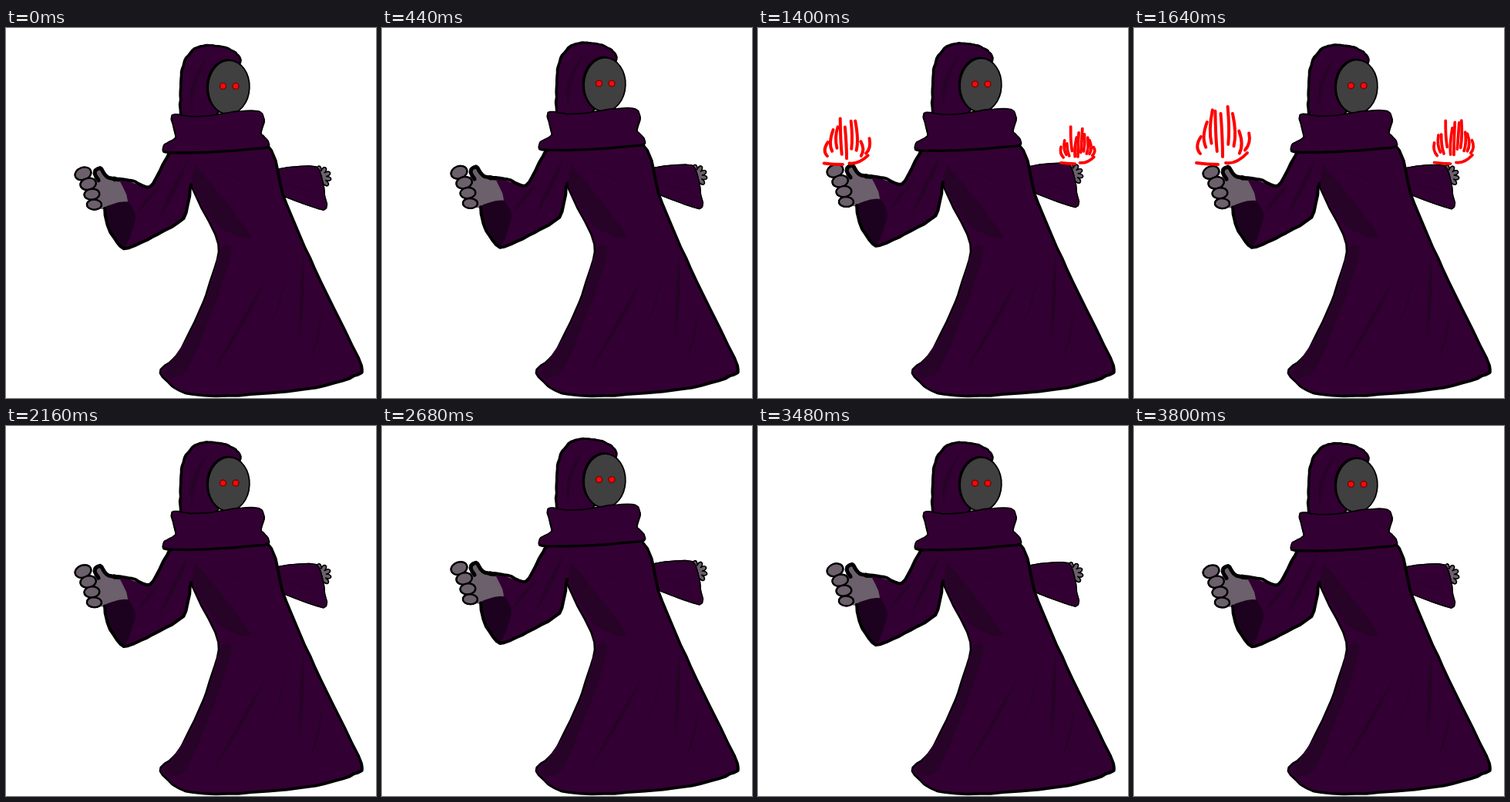
These frames come from a looping animation (480 px wide and 480 px high, 3840 ms). An HTML page with a canvas:

```html
<!DOCTYPE html>
<html lang="en">
<head>
<meta charset="utf-8">
<title>Hooded caster</title>
<style>
html, body { margin: 0; width: 100%; height: 100%; overflow: hidden; background: #fff; }
canvas { display: block; width: 480px; height: 480px; }
</style>
</head>
<body>
<canvas id="stage" width="480" height="480"></canvas>
<script>
const ctx = document.getElementById('stage').getContext('2d');
const LOOP = 3840, STEP = 40, BREATH = 1920;
const ROBE = '#330033', SHADE = '#280328', INSIDE = '#1d021f';
const FACE = '#404040', SKIN = '#6b606b', RED = '#ff0000';

function seeded(seed) {
  return () => {
    seed = (seed * 16807) % 2147483647;
    return seed / 2147483647;
  };
}
const clamp = v => Math.min(1, Math.max(0, v));

// Smooth curve through key points with a slight hand-drawn wobble.
const wobble = seeded(77);
function curve(text, closed = true) {
  const pts = text.split(' ').map(p => p.split(',').map(Number));
  const n = pts.length, path = new Path2D();
  const at = i => closed ? pts[(i + n) % n] : pts[Math.max(0, Math.min(n - 1, i))];
  for (let i = 0; i < (closed ? n : n - 1); i++) {
    const [p0, p1, p2, p3] = [at(i - 1), at(i), at(i + 1), at(i + 2)];
    for (let s = 0; s < 5; s++) {
      const u = s / 5, v = 1 - u;
      const [x, y] = [0, 1].map(k => {
        const a = p1[k] + (p2[k] - p0[k]) / 8, b = p2[k] - (p3[k] - p1[k]) / 8;
        return v ** 3 * p1[k] + 3 * v * v * u * a + 3 * v * u * u * b + u ** 3 * p2[k] + wobble() - 0.5;
      });
      path.lineTo(x, y);
    }
  }
  if (closed) path.closePath(); else path.lineTo(...pts[n - 1]);
  return path;
}
function oval(x, y, rx, ry, turn = 0) {
  const path = new Path2D();
  path.ellipse(x, y, rx, ry, turn, 0, Math.PI * 2);
  return path;
}
function fill(path, color) { ctx.fillStyle = color; ctx.fill(path); }
function stroke(path, width, color = '#000') {
  ctx.strokeStyle = color; ctx.lineWidth = width; ctx.stroke(path);
}
function shifted(dx, dy, draw) {
  ctx.save(); ctx.translate(dx, dy); draw(); ctx.restore();
}
// Filled shape whose outline is heavier on the side it is pushed towards.
function inked(path, color, width, dx = 0, dy = 0) {
  stroke(path, width);
  shifted(dx, dy, () => stroke(path, width));
  fill(path, color);
}
// Cloth crease: a bowed sliver between two points.
function fold(x1, y1, x2, y2, width, bow = 8) {
  const path = new Path2D(), mx = (x1 + x2) / 2, my = (y1 + y2) / 2;
  path.moveTo(x1, y1);
  path.quadraticCurveTo(mx + bow, my, x2, y2);
  path.quadraticCurveTo(mx + bow - width * 2, my, x1, y1);
  fill(path, SHADE);
}

const body = curve('238,150 241,203 277,280 266,330 250,373 223,425 201,447 232,472 300,475 400,465 450,450 459,437 421,358 386,285 357,215 335,150');
const sideShade = curve('279,287 293,289 276,345 235,444 206,448 250,377');
const chestShade = curve('245,178 318,270 276,258 242,204');
const sleeve = curve('140,195 187,206 207,171 214,158 246,158 240,203 230,247 190,271 153,286 133,260 128,234');
const sleeveTop = curve('140,195 163,198 187,206 207,171 214,158', false);
const sleeveHem = curve('240,203 230,247 190,271 153,286 133,260 128,234', false);
const cuff = curve('128,233 158,226 168,248 153,285 133,260');
const palm = curve('117,184 125,184 133,193 146,197 158,228 124,235 110,220');
const thumb = curve('120,198 115,187 122,182 132,194 146,197', false);
const farSleeve = curve('347,186 402,181 412,213 412,235 354,213');
const hood = curve('231,116 228,88 229,62 234,43 246,28 264,24 286,27 299,35 303,45 285,80 272,112');
const scarf = curve('216,114 240,116 264,115 300,109 328,109 334,119 330,136 339,147 335,154 262,160 208,160 207,151 221,142');
const face = oval(289, 77, 26, 34, 0.04);

function drawBody() {
  inked(body, ROBE, 5, 1.5, 1);
  fill(sideShade, SHADE);
  fill(chestShade, SHADE);
  fold(265, 182, 312, 202, 3);
  fold(338, 325, 268, 448, 6);
  fold(362, 320, 343, 386, 2);
  fold(385, 296, 380, 404, 6);
  fold(411, 363, 394, 432, 3);
}

function drawNearArm() {
  fill(sleeve, ROBE);
  fold(237, 168, 199, 246, 7);
  fold(205, 200, 170, 242, 6, 2);
  fill(palm, SKIN);
  fill(cuff, INSIDE);
  stroke(sleeveTop, 4);
  stroke(sleeveHem, 4);
  stroke(thumb, 5);
  for (let i = 0; i < 4; i++) {
    const finger = oval(100 + 7.5 * i - 0.9 * i * i, 189 + 13.4 * i, 9.5 - 0.4 * i, 6.8 - 0.5 * i, 0.13 * i - 0.35);
    inked(finger, SKIN, 4.5);
  }
}

function drawFarArm() {
  for (let i = 0; i < 5; i++) {
    const a = -1.65 + i * 0.6;
    inked(oval(407 + 10 * Math.cos(a), 194 + 10 * Math.sin(a), 4, 2, a), SKIN, 3);
  }
  fill(oval(408, 194, 7, 8), SKIN);
  inked(farSleeve, ROBE, 3);
  fold(358, 200, 408, 216, 5, 2);
}

function drawHead() {
  inked(hood, ROBE, 5, -1, -0.5);
  fold(262, 37, 242, 108, 6, -10);
  inked(face, FACE, 3.5, -1.5, -1);
  for (const x of [281.5, 298]) {
    fill(oval(x, 75.5, 4.8, 4.6), '#6d0808');
    fill(oval(x, 75.5, 3.3, 3.3), '#fa0808');
  }
  inked(scarf, ROBE, 3.5, 0, 1.5);
  for (let i = 0; i < 3; i++) fold(222 + i * 6, 150 - i * 12, 322, 145 - i * 13, 2, 3);
}

// Tongues of fire: tall in the middle, short and outward at the rim.
function flameTongues(count, seed) {
  const rand = seeded(seed), tongues = [];
  for (let i = 0; i < count; i++) {
    const u = i / (count - 1) * 2 - 1, rim = Math.abs(u);
    const foot = 8 + 22 * rand() * (1.3 - rim) + 6 * rim;
    const rise = 22 + 46 * (1 - rim) * (0.55 + 0.45 * rand());
    tongues.push({ x: u * 29, y: -foot, tipX: u * 32 + rand() * 8 - 4, tipY: -foot - rise, bow: u * 8 });
  }
  return tongues;
}
const flames = [
  { x: 115, base: 177, scale: 1, width: 4, tongues: flameTongues(9, 41) },
  { x: 415, base: 176, scale: 0.75, width: 5, tongues: flameTongues(11, 93) }
];

function drawFlame({ x, base, scale, width, tongues }, t) {
  const grow = clamp((t - 1120) / 400), end = clamp((t - 1680) / 360);
  const beat = (t - 1640) / 80, spread = scale * (0.55 + 0.45 * grow) * (1 + end * 0.45);
  const height = scale * (0.25 + 0.75 * grow) * (1 - end * 0.15);
  const ink = width * (1 - end * 0.65);
  shifted(x, base - end * 10, () => {
    tongues.forEach((g, i) => {
      const lick = 1 + 0.12 * Math.sin(beat * 2 + i * 2.4) * (beat ? 1 : 0);
      const path = new Path2D();
      path.moveTo(g.x * spread, g.y * height);
      path.quadraticCurveTo((g.x + g.bow) * spread, (g.y * 0.6 + g.tipY * 0.4) * height,
        g.tipX * spread, g.tipY * height * lick);
      if (end < 0.4 + (i * 7 % 10) * 0.06) stroke(path, ink * scale, RED);
    });
    if (end < 0.5) {
      for (const [from, to] of [[-34, -6], [4, 32]]) {
        const path = new Path2D();
        path.moveTo(from * spread, -2 * height);
        path.quadraticCurveTo((from + to) / 2 * spread, 0, to * spread, (from > 0 ? -15 : 0) * height);
        stroke(path, ink * scale, RED);
      }
    }
  });
}

function drawSparks(x, y, radius, t) {
  const rand = seeded(19), reach = radius * (1 + (t - 1080) / 500);
  fill(oval(x, y, 2, 2), RED);
  for (let i = 0; i < 5; i++) {
    const a = 0.35 + i * 1.3, r = reach * (0.85 + 0.4 * rand());
    const path = new Path2D();
    path.arc(x + r * Math.cos(a), y + r * Math.sin(a), 3, a, a + 1 + rand());
    stroke(path, 1.6, RED);
  }
}

function drawMagic(t) {
  if (t >= 960 && t < 1160) {
    drawSparks(119, 162, 18, t);
    drawSparks(415, 167, 13, t);
  } else if (t >= 1160 && t < 2040) {
    for (const flame of flames) drawFlame(flame, t);
  }
}

const lift = (t, peak, height) => -height * (1 + Math.cos((t - peak) * 2 * Math.PI / BREATH)) / 2;

function render(now) {
  const t = Math.floor((now % LOOP) / STEP) * STEP;
  const armY = lift(t, 1030, 5.4);
  ctx.fillStyle = '#fff';
  ctx.fillRect(0, 0, 480, 480);
  ctx.lineCap = ctx.lineJoin = 'round';
  shifted(0, armY, drawFarArm);
  drawBody();
  shifted(0, armY, drawNearArm);
  shifted(0, lift(t, 880, 6.2), drawHead);
  drawMagic(t);
}

function tick() {
  render(performance.now());
  requestAnimationFrame(tick);
}
tick();
</script>
</body>
</html>
```
